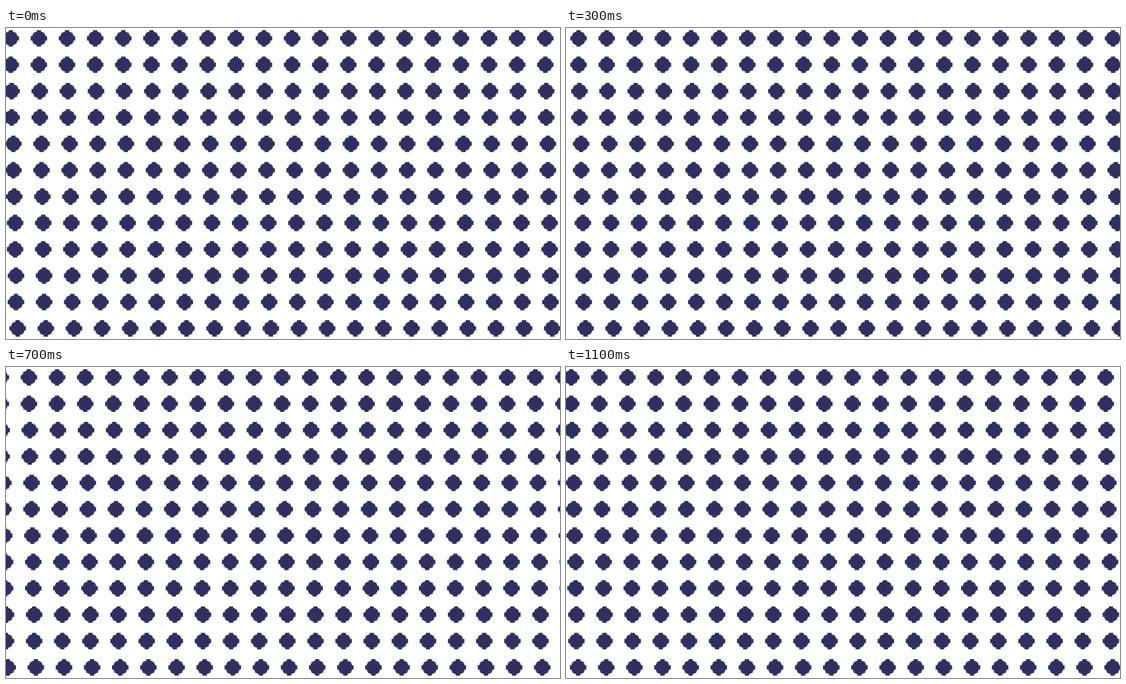
Recreate the animation shown at these times as an HTML page with a canvas. Size 998 px wide and 561 px high, loop 1200 ms.

```html
<!DOCTYPE html>
<html>
<head>
<meta charset="utf-8">
<style>
  html, body { margin: 0; width: 100%; height: 100%; overflow: hidden; background: #fff; }
  canvas { display: block; }
</style>
</head>
<body>
<canvas id="stage" width="998" height="561"></canvas>
<script>
const ctx = document.getElementById('stage').getContext('2d');

// Grid units: the stage is 1280 units wide
const WIDTH = 1280, SCALE = 998 / WIDTH;
const COL = 65, ROW = 61, SPEED = 6, STEP_MS = 100, STEPS = 12;
const LEFT = 11, TOP = 24;
const rowShift = [0, 0, 2, 2, 6, 6, 8, 10, 10, 12, 12, 16];
// Half width and half height of the bars that build one dot
const bars = [[19, 5], [15, 9], [13, 13], [9, 15], [5, 19]];

function draw(step) {
  ctx.setTransform(1, 0, 0, 1, 0, 0);
  ctx.fillStyle = '#fff';
  ctx.fillRect(0, 0, 998, 561);
  ctx.scale(SCALE, SCALE);
  ctx.fillStyle = '#303060';
  ctx.beginPath();
  rowShift.forEach((shift, row) => {
    const y = TOP + row * ROW;
    const start = LEFT + shift + step * SPEED;
    for (let x = start - 2 * COL; x < WIDTH + COL; x += COL)
      for (const [w, h] of bars) ctx.rect(x - w, y - h, 2 * w, 2 * h);
  });
  ctx.fill();
}

const begin = performance.now();
function tick() {
  const elapsed = Math.max(0, performance.now() - begin);
  draw(Math.floor(elapsed / STEP_MS) % STEPS);
  requestAnimationFrame(tick);
}
tick();
</script>
</body>
</html>
```
